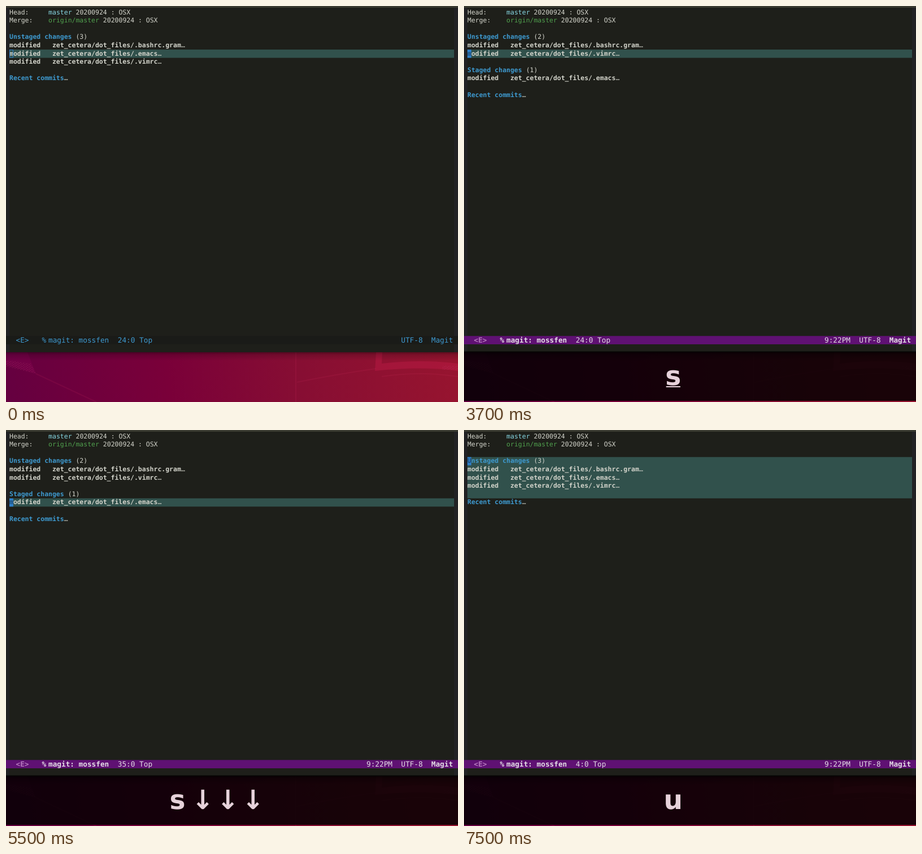
Animation, 800 px wide and 700 px high, one loop 8 s. Source, as an HTML page:

```html
<!DOCTYPE html>
<html lang="en">
<head>
<meta charset="utf-8">
<title>Staging files</title>
<style>
  html, body { margin: 0; width: 100%; height: 100%; overflow: hidden; background: #1e1f1a; }
  svg { display: block; width: 800px; height: 700px; }
  text { white-space: pre; text-rendering: geometricPrecision; font-family: "DejaVu Sans Mono", monospace; }
  .code { font-size: 11.48px; }
  .bar { font-size: 12.72px; }
  .key { font: bold 47px "DejaVu Sans", sans-serif; fill: #e6d2da; text-anchor: middle; }
  .b { font-weight: bold; }
</style>
</head>
<body>
<svg viewBox="0 0 800 700">
  <defs>
    <linearGradient id="wall" gradientUnits="userSpaceOnUse" x1="0" y1="690" x2="800" y2="610">
      <stop offset="0" stop-color="#650040"/>
      <stop offset=".36" stop-color="#7a0039"/>
      <stop offset=".65" stop-color="#870e33"/>
      <stop offset="1" stop-color="#97142f"/>
    </linearGradient>
    <linearGradient id="shade" x1="0" y1="0" x2="0" y2="1">
      <stop offset="0" stop-opacity=".6"/>
      <stop offset=".35" stop-opacity=".22"/>
      <stop offset="1" stop-opacity="0"/>
    </linearGradient>
    <pattern id="dots" width="5" height="4" patternUnits="userSpaceOnUse" patternTransform="skewY(12)">
      <circle cx="1" cy="1" r=".7" fill="#c03c70" fill-opacity=".5"/>
      <circle cx="3.5" cy="3" r=".7" fill="#c03c70" fill-opacity=".5"/>
    </pattern>
  </defs>
  <rect y="610" width="800" height="90" fill="url(#wall)"/>
  <g fill="#d02050" fill-opacity=".13">
    <path d="M0 612H38L53 650L0 634Z" fill="#b00070"/>
    <path d="M655 612H666L665 632Q735 624 800 632V645Q735 636 653 645Z" fill-opacity=".3"/>
  </g>
  <path d="M0 626L44 632L53 650L0 637Z" fill="url(#dots)"/>
  <path d="M772 636H800V643H772Z" fill="url(#dots)"/>
  <path d="M53 650L160 700M513 612V700M515 665Q590 650 655 641M665 655Q735 645 800 655" fill="none" stroke="#d03060" stroke-opacity=".12" stroke-width="2"/>
  <rect id="shadow" y="611" width="800" height="16" fill="url(#shade)"/>
  <rect width="800" height="612" fill="#1e1f1a"/>
  <rect width="6" height="612" fill="#222224"/>
  <rect x="793" width="7" height="612" fill="#222224"/>
  <rect width="800" height="3" fill="#3a3b31"/>
  <g id="view"></g>
</svg>
<script>
const LOOP = 8000, CELL = 6.911, ROW = 14.6, LEFT = 6, TOP = 4;
const INK = '#d3d4cb', BLUE = '#3e9ad0', PATH = 'zet_cetera/dot_files/';
const FILES = { bash: '.bashrc.gram', emacs: '.emacs', vim: '.vimrc' };
const view = document.getElementById('view');
const shadow = document.getElementById('shadow');

// mark: first highlighted row and row count; cur: cursor row and column
const before = { staged: false, mark: [5, 1], cur: [5, 0], pos: '24:0', focus: true };
const after = { ...before, staged: true };
const heading = { ...after, mark: [7, 3], cur: [7, 0], pos: '34:0' };
const last = { ...after, mark: [8, 1], cur: [8, 0], pos: '35:0' };
const blank = { ...after, mark: [3, 4], cur: [6, 0], pos: '33:0' };
const all = { ...before, mark: [3, 5], cur: [3, 0], pos: '4:0' };

const steps = [
  [0, { ...before, focus: false }],
  [1300, before],
  [1400, { ...before, cur: [5, 39], pos: '24:38' }],
  [3700, { ...after, keys: 's', line: true }],
  [3800, { ...after, keys: 's' }],
  [4700, { ...blank, keys: 's↓' }],
  [4800, { ...blank, keys: 's↓', line: true }],
  [5000, { ...heading, keys: 's↓', line: true }],
  [5300, { ...heading, keys: 's↓↓↓', line: true }],
  [5500, { ...last, keys: 's↓↓↓' }],
  [6800, last],
  [7300, { ...last, keys: 'u', line: true }],
  [7400, { ...all, keys: 'u', line: true }],
  [7500, { ...all, keys: 'u' }]
];

const rect = (x, y, w, h, fill, more = '') =>
  `<rect x="${x}" y="${y}" width="${w}" height="${h}" fill="${fill}" ${more}/>`;

function label(x, y, str, cls, fill) {
  const safe = str.replace(/</g, '&lt;').replace(/>/g, '&gt;');
  return `<text x="${x}" y="${y}" class="${cls}" fill="${fill}">${safe}</text>`;
}

const rowTop = row => TOP + row * ROW;

function code(row, col, str, fill = INK, bold = false) {
  return label(LEFT + col * CELL, rowTop(row) + 10.6, str, bold ? 'code b' : 'code', fill);
}

function title(row, str, tail) {
  return code(row, 0, str, BLUE, true) + code(row, str.length, tail);
}

function file(row, name) {
  const str = 'modified   ' + PATH + FILES[name];
  return code(row, 0, str, INK, true) + code(row, str.length, '…');
}

function buffer(s) {
  const unstaged = s.staged ? ['bash', 'vim'] : ['bash', 'emacs', 'vim'];
  let out = code(0, 0, 'Head:') + code(0, 10, 'master', '#87d8e4') + code(0, 17, '20200924 : OSX') +
    code(1, 0, 'Merge:') + code(1, 10, 'origin/master', '#50a04e') + code(1, 24, '20200924 : OSX') +
    title(3, 'Unstaged changes', ` (${unstaged.length})`);
  unstaged.forEach((name, i) => out += file(4 + i, name));
  if (s.staged) out += title(7, 'Staged changes', ' (1)') + file(8, 'emacs');
  return out + title(s.staged ? 10 : 8, 'Recent commits', '…');
}

function cursor(s) {
  const [row, col] = s.cur, x = LEFT + col * CELL, y = rowTop(row);
  if (!s.focus) return rect(x + .5, y + .5, CELL - 1, ROW - 1, 'none', 'stroke="#2f7fc8"');
  const heads = { 3: 'U', 7: 'S' };
  const char = col || row === 6 ? '' : heads[row] || 'm';
  return rect(x, y, CELL, ROW, '#2f7fc8') + code(row, col, char, '#214d74', true);
}

function modeline(s) {
  const ink = s.focus ? '#e3dce5' : BLUE, strong = s.focus ? 'bar b' : 'bar';
  const put = (x, str, cls = 'bar', fill = ink) => label(x, 595, str, cls, fill);
  return rect(0, 583.3, 800, 14.7, s.focus ? '#5f1173' : '#1a1b18') +
    put(17.5, '<E>', strong, s.focus ? '#b578bd' : BLUE) +
    put(63.5, '%', strong) + put(75, 'magit: mossfen', strong) + put(197.8, s.pos + ' Top') +
    (s.focus ? put(638, '9:22PM') : '') + put(699.3, 'UTF-8') + put(752.8, 'Magit', strong);
}

function overlay(s) {
  if (!s.keys) return '';
  const chars = [...s.keys], arrows = chars.length - 1;
  let out = rect(0, 610.5, 800, 87.5, '#000', 'fill-opacity=".83"');
  chars.forEach((c, i) => {
    const x = i ? 364.6 - arrows * 22.25 + 44.5 * i + 5.9 : 370.3 - arrows * 22.25;
    out += `<text x="${x}" y="670" class="key">${c}</text>`;
    if (s.line && i === arrows) {
      const half = i ? 19.2 : 12.6;
      out += rect(x - half, 672, half * 2, 2, '#e6d2da');
    }
  });
  return out;
}

function draw(s) {
  const [row, count] = s.mark;
  shadow.setAttribute('opacity', s.focus ? 1 : .7);
  view.innerHTML = rect(LEFT, rowTop(row), 787, count * ROW, '#31514c') +
    buffer(s) + cursor(s) + modeline(s) + overlay(s);
}

let shown;
function tick() {
  const t = performance.now() % LOOP;
  const state = steps.findLast(([at]) => at <= t)[1];
  if (state !== shown) draw(shown = state);
  requestAnimationFrame(tick);
}
tick();
</script>
</body>
</html>
```
